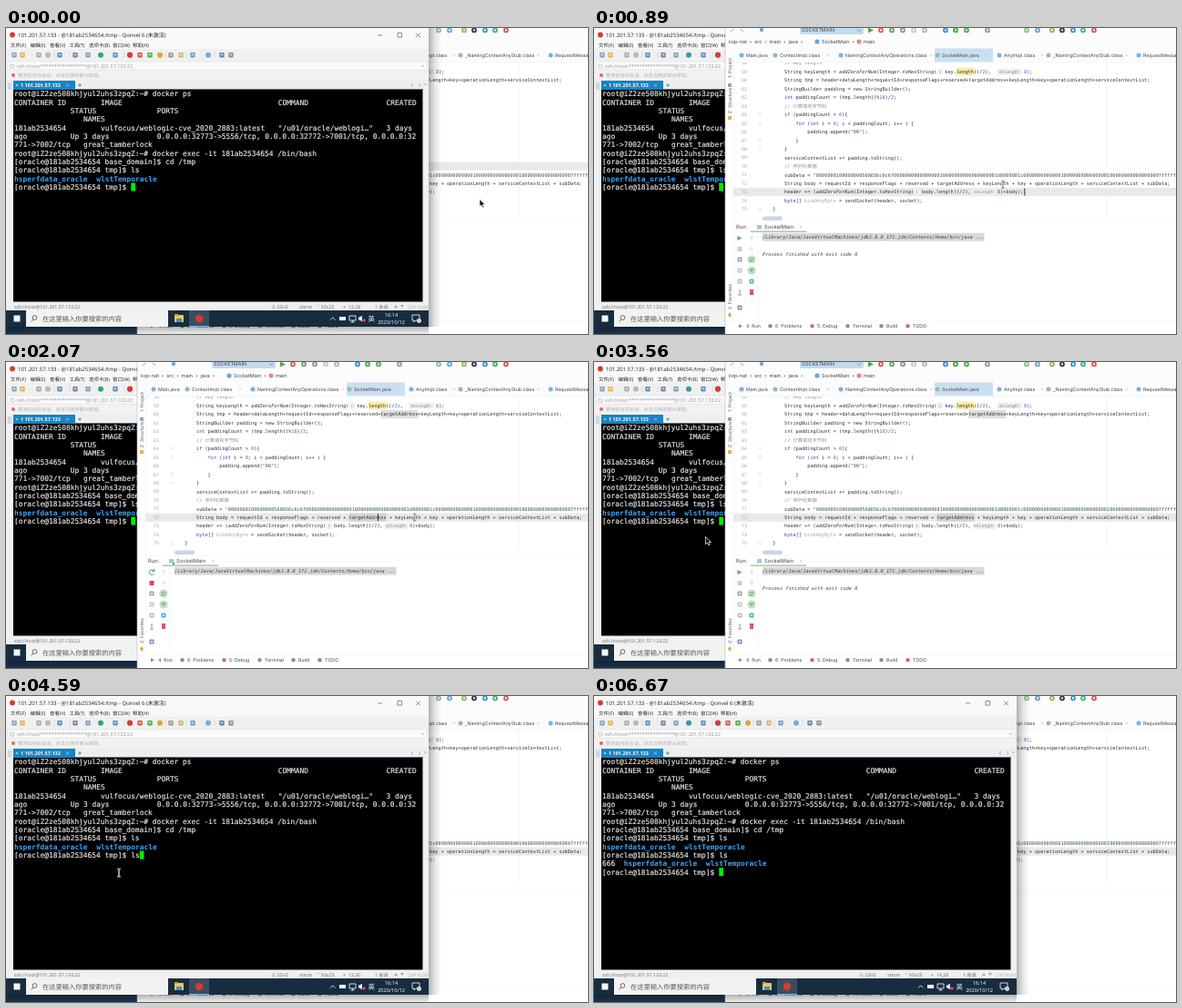
These frames come from a looping animation (639x337 px, 6.77 s). An HTML page:

```html
<!DOCTYPE html>
<html lang="en">
<head>
<meta charset="utf-8">
<title>Terminal and editor</title>
<style>
html, body { margin: 0; width: 100%; height: 100%; overflow: hidden; background: #1a3550; }
svg { display: block; width: 100%; height: 100%; }
text { white-space: pre; text-rendering: geometricPrecision; font-family: Inter, "Noto Sans CJK SC", "DejaVu Sans", sans-serif; }
.mono { font-family: "DejaVu Sans Mono", "Noto Sans CJK SC", monospace; }
.win { font-family: "Open Sans", "Noto Sans CJK SC", sans-serif; }
</style>
</head>
<body>
<svg id="stage" viewBox="0 0 639 337" preserveAspectRatio="none"></svg>
<script>
const LOOP = 6770, STEP = 148.2;
const esc = s => s.replace(/&/g, '&amp;').replace(/</g, '&lt;').replace(/>/g, '&gt;');
const rect = (x, y, w, h, fill, more = '') =>
  `<rect x="${x}" y="${y}" width="${w}" height="${h}" fill="${fill}" ${more}/>`;
const dot = (x, y, r, fill, more = '') => `<circle cx="${x}" cy="${y}" r="${r}" fill="${fill}" ${more}/>`;
const path = (d, stroke, w = 0.8, fill = 'none') =>
  `<path d="${d}" stroke="${stroke}" stroke-width="${w}" fill="${fill}"/>`;
// y is the middle of the line
const raw = (x, y, inner, size, fill, more = '') =>
  `<text x="${x}" y="${y + size * 0.36}" font-size="${size}" fill="${fill}" ${more}>${inner}</text>`;
const label = (x, y, s, size = 5.3, fill = '#444', more = '') => raw(x, y, esc(s), size, fill, more);
const group = (id, inner) => `<g id="${id}">${inner}</g>`;
const play = (x, y, fill = '#5fb45a', r = 2.6) => path(`M${x - r} ${y - r}l${r * 2} ${r}l${-r * 2} ${r}z`, 'none', 0, fill);

// ---------- terminal window ----------
const CW = 4.75, TX = 9;
const rowY = n => 72.5 + 9.33 * n;
const term = (row, col, s, more = 'stroke="#e8e8e8" stroke-width=".16"', fill = '#e8e8e8') =>
  label(TX + col * CW, rowY(row), s, 7.89, fill, `class="mono" ${more}`);
const win = (x, y, s, size, fill, more = '') => label(x, y, s, size, fill, `class="win" ${more}`);
const PROMPT = '[oracle@181ab2534654 tmp]$ ';
const folder = (row, col, s) => term(row, col, s, 'font-weight="bold"', '#3ba4f8');
const listing = (row, col) => folder(row, col, 'hsperfdata_oracle') + folder(row, col + 19, 'wlstTemporacle');

function shadow() {
  const fade = (id, dir) => `<linearGradient id="${id}" x2="${dir === 'x' ? 1 : 0}" y2="${dir === 'y' ? 1 : 0}">` +
    '<stop stop-opacity=".3"/><stop offset=".5" stop-opacity=".1"/><stop offset="1" stop-opacity="0"/></linearGradient>';
  return fade('fadeX', 'x') + fade('fadeY', 'y') +
    rect(464, 0, 14, 329, 'url(#fadeX)') + rect(0, 329, 464, 14, 'url(#fadeY)');
}

function terminalBars() {
  const icons = [
    [9, '#7fa6c8'], [18, '#e8b44a'], [36, '#a9a9a9'], [46, '#b9b9b9'], [59, '#5d8fc0'], [76, '#6c89a8'],
    [90, '#7f9fbd'], [104, '#3b9c8f'], [120, '#5f8fc4'], [147, '#d9574a'], [158, '#4fb04a'],
    [169, '#d9a832'], [181, '#9a9a9a'], [192, '#d8b27a'], [205, '#6f9ec9'], [222, '#7fa8cf'], [237, '#5c88b5'], [247, '#8f8f8f']
  ];
  const lines = ['M53 26v7', 'M70 26v7', 'M130 26v7', 'M175 26v7', 'M198 26v7', 'M229 26v7'].join('');
  return rect(0, 0, 464, 329, '#f0f0f0') + rect(0, 0, 464, 13, '#f8f9fa') + dot(7, 7.5, 2.9, '#d93a32') +
    win(13, 7.8, '101.201.57.133 - @181ab2534654:/tmp - Qonvel 6 (未激活)', 6, '#222') +
    path('M408 8h5M430 5.5h4.6v4.6h-4.6zM450 5.5l5 5M455 5.5l-5 5', '#444', 0.6) +
    rect(0, 13, 464, 10, '#f8f8f8') +
    ['文件(F)', '编辑(E)', '查看(V)', '工具(T)', '选项卡(B)', '窗口(W)', '帮助(H)']
      .map((s, i) => win([5, 26.5, 48, 69.5, 91, 117, 139][i], 18.7, s, 5.4, '#222')).join('') +
    path(lines, '#cfcfcf', 0.6) +
    icons.map(([x, c], i) => i % 4 == 3
      ? dot(x, 29.7, 3, c) : rect(x - 2.7, 27, 5.4, 5.4, c, 'rx="0.8"') + rect(x - 1.3, 28.5, 2.6, 1.8, '#fff', 'opacity=".65"')).join('') +
    dot(136, 29.7, 3.1, '#d93a32') +
    rect(2, 37, 460, 9, '#fafafa', 'stroke="#dcdcdc" stroke-width=".5"') +
    path('M5 40v4h4v-3z', '#aaa', 0.6) +
    win(12, 41.7, 'ssh://root:*****************@101.201.57.133:22', 5.4, '#8f8f8f') +
    path('M456 41l1.5 1.5l1.5-1.5', '#777', 0.6) +
    rect(0, 47, 464, 10, '#f2f2f2') + dot(8, 52, 2, '#e0685e') +
    win(13, 52, '要添加当前会话，点击左侧的箭头按钮。', 5.2, '#b0b0b0') +
    rect(0, 57, 464, 11, '#eeeeee') + rect(8, 58, 68, 10, '#1683c6') +
    dot(12, 63, 1.3, '#7fdc72') + win(16, 63, '1 101.201.57.133', 5.5, '#fff', 'font-weight="bold"') +
    path('M66 61.5l3 3M69 61.5l-3 3', '#cfe6f2', 0.6) + path('M79 63h4M81 61v4', '#666', 0.7) +
    path('M447 61l-2 2l2 2M453 61l2 2l-2 2M459 62h3', '#888', 0.6) +
    rect(8, 67, 450, 1, '#1683c6') + rect(2, 60, 4, 8, '#cfd8e0') +
    rect(8, 68, 449.5, 233.5, '#000') + rect(458, 68, 6, 234, '#f0f0f0');
}

function terminalText() {
  return term(0, 0, 'root@iZ2ze508khjyul2uhs3zpqZ:~# docker ps') +
    term(1, 0, 'CONTAINER ID') + term(1, 20, 'IMAGE') + term(1, 61, 'COMMAND') + term(1, 86, 'CREATED') +
    term(2, 13, 'STATUS') + term(2, 33, 'PORTS') + term(3, 16, 'NAMES') +
    term(4, 0, '181ab2534654') + term(4, 20, 'vulfocus/weblogic-cve_2020_2883:latest') +
    term(4, 61, '"/u01/oracle/weblogi…"') + term(4, 86, '3 days') +
    term(5, 0, 'ago') + term(5, 13, 'Up 3 days') +
    term(5, 33, '0.0.0.0:32773->5556/tcp, 0.0.0.0:32772->7001/tcp, 0.0.0.0:32') +
    term(6, 0, '771->7002/tcp') + term(6, 16, 'great_tamberlock') +
    term(7, 0, 'root@iZ2ze508khjyul2uhs3zpqZ:~# docker exec -it 181ab2534654 /bin/bash') +
    term(8, 0, '[oracle@181ab2534654 base_domain]$ cd /tmp') +
    term(9, 0, PROMPT + 'ls') + listing(10, 0) + term(11, 0, PROMPT) +
    group('typedL', term(11, 27, 'l')) + group('typedS', term(11, 28, 's')) +
    group('result', term(12, 0, '666') + listing(12, 5) + term(13, 0, PROMPT)) +
    rect(0, 0, CW, 9, '#00ee00', 'id="block"');
}

function terminalFoot() {
  const st = (x, s) => win(x, 306.7, s, 5.2, '#666');
  return rect(0, 302, 464, 9, '#f0f0f0') + st(9, 'ssh://root@101.201.57.133:22') +
    st(291, '≡ SSH2') + st(322, 'xterm') + st(342, '⌜ 93x25') + st(370, '⌖') +
    win(376, 306.7, '12,28', 5.2, '#666', 'id="pos"') + st(405, '1 会话') +
    path('M426 308l2-3l2 3zM433 305l2 3l2-3z', 'none', 0, '#8fae8f') + win(441, 306.7, 'CAP NUM', 5, '#b4b4b4') +
    rect(0, 311, 464, 18, '#182c40') + rect(8.5, 316.5, 7, 7, '#f4f8fb') +
    rect(22, 311, 156, 18, '#f2f2f2') + dot(31.5, 319, 2.4, 'none', 'stroke="#333" stroke-width=".7"') +
    path('M29.8 321l-2 2.5', '#333', 0.7) + win(40, 320, '在这里输入你要搜索的内容', 7.25, '#555') +
    rect(185, 316, 10, 8, '#f2c64f', 'rx=".6"') + rect(185, 315, 4, 2, '#d99b27') + rect(187, 320, 6, 4, '#3d8fd6') +
    rect(201, 311, 22, 18, '#3a4c5e') + rect(201, 328, 22, 1, '#79b8ea') + dot(212, 320, 4.2, '#d93a32') +
    path('M356 321.5l2.7-2.7l2.7 2.7', '#fff', 0.8) + rect(366, 318, 7, 4, '#fff') +
    path('M377 317h7v5h-7zM380.5 322v2M378.5 324h4', '#fff', 0.8) +
    path('M387 318.5h1.6l2.2-2v7l-2.2-2h-1.6z', 'none', 0, '#fff') + dot(393, 322, 1.7, '#e04b40') +
    win(397.5, 320, '英', 7.4, '#fff') +
    win(423, 316, '16:14', 5.6, '#fff', 'text-anchor="middle"') +
    win(423, 324, '2020/10/12', 5.6, '#fff', 'text-anchor="middle"') +
    path('M446 316h8v6h-4l-2 2v-2h-2z', '#fff', 0.8) + dot(453.5, 322.5, 2.4, '#eee') +
    win(453.5, 322.6, '1', 4, '#222', 'text-anchor="middle"');
}

// ---------- editor window ----------
const EW = 3.16, EX = 183.7, ES = 5.25;
const lineY = n => 48 + 9.47 * (n - 59);
const STYLES = [
  [/^\/\//, 'fill="#8c8c8c"'], [/^"/, 'fill="#35564f"'], [/^\d/, 'fill="#3a62d8"'],
  [/^(int|if|for|byte)$/, 'fill="#2a47a8"'], [/^bind/, 'fill="#a5a5a5"'], [/^(add|toHex|send)/, 'font-style="italic"']
];
const TOKENS = /\/\/.*|"[^"]*"?|\b(?:int|if|for|byte|bindAnyByte|addZeroForNum|toHexString|sendSocket|\d+)\b/g;
// tokens are matched on plain text, then escaped
function paint(s) {
  let out = '', at = 0;
  for (const m of s.matchAll(TOKENS)) {
    const style = STYLES.find(([re]) => re.test(m[0]));
    out += esc(s.slice(at, m.index)) + `<tspan ${style[1]}>${esc(m[0])}</tspan>`;
    at = m.index + m[0].length;
  }
  return out + esc(s.slice(at));
}
const codeAt = (x, n, s) => raw(x, lineY(n), paint(s), ES, '#333', 'class="mono"');
const code = (n, col, s) => codeAt(EX + col * EW, n, s);
const hint = (x, n, w, s) => rect(x, lineY(n) - 3.6, w, 7.2, '#f0f0f0', 'rx="1.5"') +
  label(x + w / 2, lineY(n), s, 4.8, '#8a8a8a', 'text-anchor="middle"');
const band = (n, col, len, fill) => rect(EX + col * EW, lineY(n) - 4.6, len * EW, 9.2, fill);

function source() {
  const hex = 'subData = "0000000100000000568656c6c6f000000000000000010000000000000000001d8000001c';
  return code(58, 8, '// key length') +
    rect(398, lineY(59) - 4.4, 19.5, 8.8, '#fbeaa9') +
    code(59, 8, 'String keyLength = addZeroForNum(Integer.toHexString(') + hint(377.5, 59, 6, 'i:') +
    codeAt(385.3, 59, 'key.length()/2),') + hint(442, 59, 28, 'strLength:') + codeAt(472, 59, '8);') +
    code(60, 8, 'String tmp = header+dataLength+requestId+responseFlags+reserved+targetAddress+keyLength+key+operationLength+serviceContextList;') +
    code(61, 8, 'StringBuilder padding = new StringBuilder();') +
    code(62, 8, 'int paddingCount = (tmp.length()%16)/2;') +
    code(63, 8, '// 计算填充字节码') +
    code(64, 8, 'if (paddingCount > 0){') +
    code(65, 12, 'for (int i = 0; i < paddingCount; i++ ) {') +
    code(66, 16, 'padding.append("00");') + code(67, 12, '}') + code(68, 8, '}') +
    code(69, 8, 'serviceContextList += padding.toString();') +
    code(70, 8, '// 序列化数据') +
    code(71, 8, (hex.padEnd(96, '0') + '1').padEnd(113, '0').replace(/0$/, '1').padEnd(130, '0') + '7fffffff') +
    code(72, 8, 'String body = requestId + responseFlags + reserved + targetAddress + keyLength + key + operationLength + serviceContextList + subData;') +
    code(73, 8, 'header += (addZeroForNum(Integer.toHexString(') + hint(352, 73, 6, 'i:') +
    codeAt(360, 73, 'body.length()/2),') + hint(415.5, 73, 26, 'strLength:') + codeAt(443, 73, '8)+body);') +
    code(74, 8, 'byte[] bindAnyByte = sendSocket(header, socket);') + code(75, 4, '}');
}

function ideTop() {
  const icons = [[304, '#4fa652'], [315, '#d8604f'], [327, '#6f9e75'], [339, '#8b9a8d'], [351, '#c9c9c9'], [363, '#b8b8b8'],
    [386, '#3f8fd0'], [397, '#4fa652'], [409, '#56a85c'], [432, '#9b9b9b'], [475, '#8dc08d'], [487, '#68a5d8'],
    [503, '#8cba62'], [514, '#333b44'], [526, '#3b9ac4'], [537, '#45b08a'], [549, '#d75959']];
  const tabs = [[167, 'Main.java'], [204, 'ContextImpl.class'], [276, 'NamingContextAnyOperations.class'], [382, 'SocketMain.java'],
    [450, 'AnyImpl.class'], [504, '_NamingContextAnyStub.class'], [603, 'RequestMessage.class']];
  return rect(144, 0, 495, 337, '#fff') + rect(144, 0, 495, 37.5, '#fcfcfc') +
    rect(226, -4, 70, 11, '#c3dbef', 'rx="2"') +
    path('M150 4l3-3M161 1l3 3', '#888', 0.8) + dot(184, 2, 2.2, '#7aa7cf') +
    label(228, 2.5, 'SOCKETMAIN', 5.4) + path('M289 1.5l2 2l2-2', '#666', 0.7) +
    icons.map(([x, c], i) => i ? dot(x, 2.4, 2.9, c) + dot(x, 2.4, 1.1, '#fff') : play(x, 2.4, c, 3)).join('') +
    label(148, 15, 'iiop-nat  ›  src  ›  main  ›  java  ›', 5.5) + dot(245, 15, 2.6, '#6aa9d8') +
    label(250, 15, 'SocketMain  ›', 5.5) + dot(291, 15, 2.6, '#d98f8f') + label(296, 15, 'main', 5.5) +
    rect(374, 22.5, 64, 15, '#c9e0f3') + path('M144 37.7H639', '#ececec', 0.5) +
    tabs.map(([x, s], i) => dot(x - 5, 30, 2.5, ['#7ab3dc', '#8fc0a9'][i % 2]) + label(x, 30.3, s, 5.25) +
      path(`M${x + s.length * 2.75 + 5} 28.7l2.6 2.6m0-2.6l-2.6 2.6`, '#bbb', 0.5)).join('') +
    path('M153.5 23V323', '#ececec', 0.5) +
    [[44, '1: Project'], [80, 'Z: Structure'], [296, '2: Favorites']].map(([y, s]) =>
      `<g transform="translate(149 ${y}) rotate(-90)">${label(0, 0, s, 5.1, '#555', 'text-anchor="middle"')}</g>`).join('') +
    rect(147, 61, 4, 4, '#8ba5bd') + rect(147, 97, 4, 4, '#d8b25a') + path('M147 316l2-3l2 3l-2 3z', 'none', 0, '#e0a83b');
}

function ideEditor() {
  let gutter = '';
  for (let n = 58; n <= 75; n++) gutter += label(168, lineY(n), '' + n, 4.9, '#a5a5a5', 'text-anchor="end" class="mono"');
  for (const n of [64, 65, 67, 68, 75]) gutter += rect(180.8, lineY(n) - 1.4, 2.6, 2.8, '#fff', 'stroke="#dcdcdc" stroke-width=".5"');
  return `<svg x="144" y="38" width="495" height="169" viewBox="144 38 495 169">` +
    rect(153, 0, 486, 9.2, '#e9e9e9', 'id="line"') + path('M563 38V207', '#e6e6e6', 0.5) +
    gutter + group('uses', band(72, 61, 13, '#d4d4d6') + band(60, 72, 13, '#dedee2')) + source() +
    rect(0, 0, 0.8, 8, '#000', 'id="caret"') + `</svg>` +
    rect(185, 207.5, 22, 4.4, '#c8d6e8', 'rx="2.2"');
}

function ideRun() {
  const tool = (x, y, c) => rect(x - 2.5, y - 2.5, 5, 5, c, 'rx="1"') + rect(x - 1, y - 1, 2, 2, '#fff');
  const foot = [[167, '4: Run'], [199, '6: Problems'], [245, '5: Debug'], [284, 'Terminal'], [321, 'Build'], [350, 'TODO']];
  return path('M153 213H639', '#f0f0f0', 0.5) +
    label(156, 219.3, 'Run:', 5.8) + rect(172, 223.4, 61, 1.6, '#a5cf96') +
    rect(179, 217, 5, 4.5, '#a9c3da') + label(187, 219.3, 'SocketMain', 5.8) + path('M226 218l2.5 2.5m0-2.5l-2.5 2.5', '#aaa', 0.5) +
    path('M180 225V323', '#efefef', 0.5) +
    tool(160, 255, '#9aa2a9') + tool(160, 267, '#c6c6c6') + tool(160, 279, '#bcbcbc') +
    path('M160 289v5m-2 0h4m-3-5h2', '#888', 0.8) + tool(160, 308, '#a678b8') +
    path('M173 234v-5m-2 2l2-2l2 2M173 240v5m-2-2l2 2l2-2', '#d4d4d4', 0.8) +
    dot(173, 255, 4.6, '#c3e0c4') + dot(173, 267, 4.6, '#c3e0c4') +
    path('M170.5 254h5m-5 2.5h4M170.5 266h5m-2.5 0v3', '#5b8f60', 0.8) + tool(173, 279, '#4ab0c8') +
    rect(171, 289, 4, 5, '#e0566a') + rect(170.5, 288, 5, 1, '#e0566a') +
    group('idle', play(160, 231.5) + rect(157.5, 241, 5, 5, '#cfcfcf')) +
    group('busy', path('M162.3 230a2.8 2.8 0 1 0 .2 3M162.8 228v2.6h-2.6', '#4fa652', 1) +
      rect(157.5, 241, 5, 5, '#e0455a') + dot(184, 222, 1.3, '#45b04a')) +
    rect(185, 225.8, 243.5, 8.8, '#d8d8d8') +
    label(185, 230.2, '/Library/Java/JavaVirtualMachines/jdk1.8.0_171.jdk/Contents/Home/bin/java ...', ES, '#3a4048', 'class="mono" font-style="italic"') +
    group('done', label(185, 249.2, 'Process finished with exit code 0', ES, '#39465c', 'class="mono" font-style="italic"')) +
    path('M144 323H639', '#efefef', 0.5) +
    foot.map(([x, s], i) => (i ? rect(x - 7.5, 326.2, 4, 4, ['#8d8d8d', '#8d8d8d', '#c2706c'][i % 3], 'rx="1"') : play(161, 328.3, '#4fa652', 2)) +
      label(x, 328.4, s, 5.2)).join('') + path('M144 0V337', '#b5b5b5', 0.6);
}

function menu() {
  const items = [[11, 'Paste', '⌘V'], [26, 'Copy / Paste Special', '›'], [41, 'Column Selection Mode', '⇧⌘8'], [61, 'Find Usages', '⌥F7'],
    [76, 'Refactor', '›'], [97, 'Folding', '›'], [112, 'Analyze', '›'], [132, 'Go To', '›'], [147, 'Generate...', '⌘N'],
    [167, "Run 'SocketMain.main()'", '⌃⇧R'], [182, "Debug 'SocketMain.main()'", '⌃⇧D'], [197, "Run 'SocketMain.main()' with Coverage"],
    [212, "Profile 'SocketMain.main()'"], [232, "Edit 'SocketMain.main()'..."], [253, 'Reveal in Finder'], [268, 'Open in Terminal'],
    [288, 'Local History', '›'], [308, 'Compare with Clipboard'], [328, 'HexView']];
  const seps = [51, 86, 122, 157, 222, 242, 278, 298, 318].map(y => `M408 ${y}H551`).join('');
  const row = ([y, s, key = ''], c) => label(420.5, y, s, 6.35, c) + label(545, y, key, 6.6, c, 'text-anchor="end"');
  return rect(406.5, -5, 146, 350, '#000', 'opacity=".12"') + rect(408, -5, 143, 350, '#f1f1f1', 'stroke="#c2c2c2" stroke-width=".6"') +
    path(seps, '#d9d9d9', 0.6) + items.map(i => row(i, '#333')).join('') +
    rect(411, 9, 5, 5, '#8d99a5') + play(414, 182, '#5fa463', 2.2) + play(414, 197, '#4fa652', 2.5) + rect(411.5, 210, 5, 5, '#6fa87c') +
    rect(411.5, 230, 5, 5, '#9aa6b1') + rect(411.5, 266, 5, 4, '#7b858e') + rect(411.5, 306, 5, 4.5, '#5ea0cf') +
    group('hover', rect(408.3, 160, 142.4, 14.4, '#a5bdea') + row(items[9], '#fff')) + play(414, 167, '#4fa652', 2.5);
}

const BEAM = 'M-1.8-4.2Q0-4.2 0-3V3Q0 4.2-1.8 4.2M1.8-4.2Q0-4.2 0-3M0 3Q0 4.2 1.8 4.2';
const stage = document.getElementById('stage');
stage.innerHTML = rect(0, 0, 639, 337, '#1a3550') +
  group('ide', ideTop() + ideEditor() + ideRun() + group('menu', menu())) +
  group('terminal', shadow() + terminalBars() + terminalText() + terminalFoot()) +
  group('pointer', group('arrow', path('M0 0V8.2L2 6.5L3.3 9.4L4.7 8.7L3.4 6H6z', '#fff', 0.7, '#111')) +
    group('beam', path(BEAM, '#fff', 1.6) + path(BEAM, '#444', 0.7)));

const ui = {};
stage.querySelectorAll('[id]').forEach(el => ui[el.id] = el);
const show = (id, on) => ui[id].setAttribute('display', on ? 'inline' : 'none');
const move = (id, x, y) => ui[id].setAttribute('transform', `translate(${x} ${y})`);

// pointer stops: step, x, y
const STOPS = [[0, 520, 188.5], [1, 520, 185], [3, 519, 177], [5, 490, 174], [7, 408, 171], [9, 448.5, 171], [18, 449, 171],
  [24, 122.5, 192.5], [25, 124, 194.5], [34, 124, 194.5], [40, 624, 323]];
function pointerAt(k) {
  let i = 0;
  while (i < STOPS.length - 2 && STOPS[i + 1][0] <= k) i++;
  const [a, b] = [STOPS[i], STOPS[i + 1]], u = Math.min(1, (k - a[0]) / (b[0] - a[0]));
  return [1, 2].map(c => a[c] + (b[c] - a[c]) * u);
}

function draw(t) {
  const k = Math.floor(t / STEP + 0.06);
  const within = (a, b) => k >= a && k < b;
  const front = within(2, 25) ? ui.ide : ui.terminal;
  if (ui.pointer.previousSibling !== front) stage.insertBefore(front, ui.pointer);

  const line = k < 2 ? 70 : k < 9 ? 73 : 72, busy = within(12, 17);
  ui.line.setAttribute('y', lineY(line) - 4.6);
  show('uses', line === 72);
  show('caret', within(3, 8) || within(9, 17));
  move('caret', line === 72 ? 408 : 472.5, lineY(line) - 4);
  show('menu', within(8, 11));
  show('hover', k >= 9);
  show('idle', !busy);
  show('busy', busy);
  show('done', !busy);

  const sent = k >= 33, typed = (k >= 29) + (k >= 30);
  show('typedL', typed > 0);
  show('typedS', typed > 1);
  show('result', sent);
  const col = sent ? 27 : 27 + typed, row = sent ? 13 : 11;
  move('block', TX + col * CW, rowY(row) - 4.6);
  ui.pos.textContent = `${row + 1},${col + 1}`;

  const beam = within(3, 8) || within(11, 20) || within(25, 36);
  show('pointer', k < 41);
  show('beam', beam);
  show('arrow', !beam);
  move('pointer', ...pointerAt(k));
}

function tick(now) {
  draw(now % LOOP);
  requestAnimationFrame(tick);
}
draw(0);
requestAnimationFrame(tick);
</script>
</body>
</html>
```
